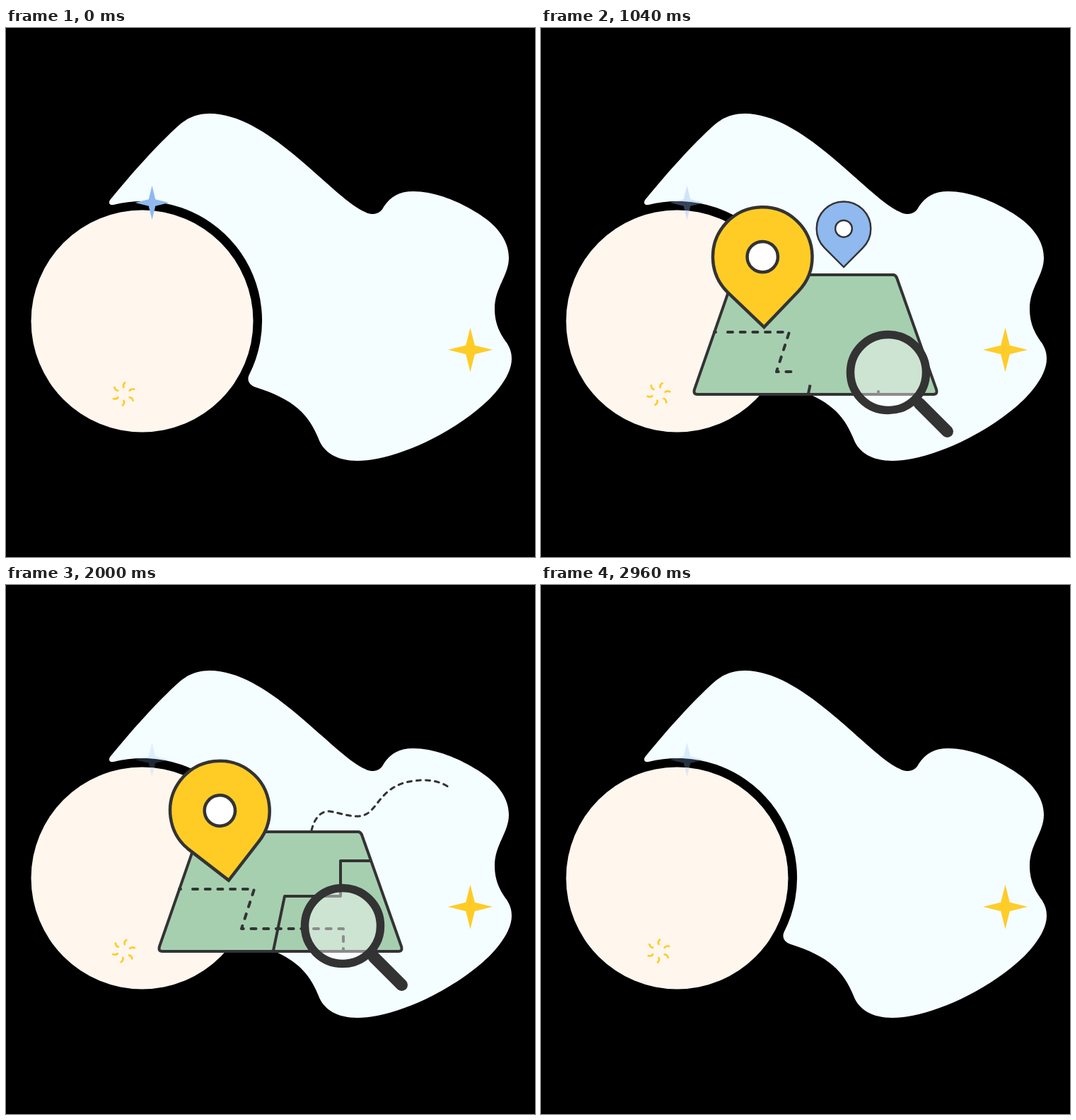
Write an HTML page that moves like this. It is 748x748 px and loops after 3000 ms.

```html
<!DOCTYPE html>
<html lang="en">
<head>
<meta charset="utf-8">
<title>Map search</title>
<style>
html, body { margin: 0; height: 100%; overflow: hidden; background: #000; }
svg { display: block; width: 100%; height: 100%; }
.line { fill: none; stroke: #333; stroke-width: 4; stroke-linecap: round; stroke-linejoin: round; }
</style>
</head>
<body>
<svg viewBox="0 0 748 748">
  <defs>
    <path id="star" d="M0-1L.2-.2 1 0 .2.2 0 1-.2.2-1 0-.2-.2Z"/>
    <g id="pin" stroke="#333" stroke-width="4.5">
      <path d="M0 0L-49.7-49.7A70.3 70.3 0 1 1 49.7-49.7Z"/>
      <circle cy="-99.4" r="21.7" fill="#fff"/>
    </g>
  </defs>

  <path fill="#f4fdff" d="M148 242C180 203 215 164 244 138C257 126 272 121 288 121
    C380 121 478 263 519 263C526 263 531 259 534 253C544 238 556 231 576 231
    C618 231 665 258 685 275C704 292 711 309 711 325C711 350 691 367 691 397
    C691 420 700 434 708 445C713 453 715 459 715 468C715 490 694 518 665 541
    C610 585 540 612 497 612C468 612 449 600 442 581C428 546 407 525 353 508
    C344 505 340 498 344 490A169 169 0 0 0 152 250C146 251 144 247 148 242Z"/>
  <circle cx="192.5" cy="414.5" r="157" fill="#fff6ee"/>
  <use id="blueStar" href="#star" fill="#8fb9ef" transform="translate(206.5 247) scale(24)"/>
  <use id="yellowStar" href="#star" fill="#ffcc26" transform="translate(656.5 455) scale(31.5)"/>
  <g id="burst" fill="none" stroke="#ffcc26" stroke-width="2.7" stroke-linecap="round"></g>

  <g id="map">
    <path id="trail" class="line" style="stroke-width:3" d="M432 347C436 330 445 319 458 320
      C474 323 484 327 497 327C530 327 522 276 592 276C606 276 618 280 626 286"/>
    <path id="trailDot" class="line" style="stroke-width:3" d="M620.5 282.5l1.5.8"/>
    <path class="line" style="fill:#a6cfb0" d="M278 349H498Q501 349 503 353L559 511Q561 518 555 518
      H221Q215 518 217 511L272 353Q274 349 278 349Z"/>
    <path id="route" class="line" d="M245 430h2m17 0H351L333 486H477V516"/>
    <path id="routeDot" class="line" d="M477 514v.4"/>
    <path id="road" class="line" style="stroke-linecap:butt" d="M378 517L394 440H473V390H517"/>
  </g>
  <use id="bluePin" href="#pin" fill="#8fb9ef"/>
  <use id="yellowPin" href="#pin" fill="#ffcc26"/>
  <g id="lens">
    <path class="line" style="stroke-width:17" d="M44 44L83.5 83.5"/>
    <circle r="53.5" fill="#fff" fill-opacity=".43" stroke="#333" stroke-width="11.5"/>
  </g>
</svg>
<script>
const LOOP = 3000, STEP = 40;
const el = Object.fromEntries([...document.querySelectorAll('svg [id]')].map(e => [e.id, e]));
const clamp = v => Math.max(0, Math.min(1, v));
const ramp = (t, from, to) => clamp((t - from) / (to - from));
const fade = (t, a, b, c, d) => Math.min(ramp(t, a, b), 1 - ramp(t, c, d));
const show = (e, opacity) => e.setAttribute('opacity', opacity);
const move = (e, transform) => e.setAttribute('transform', transform);

// Keys are [time, value...]; column i is read, linear or as a smooth spline.
function track(keys, t, i = 1, smooth = false) {
  let k = keys.findIndex(key => key[0] > t);
  if (k < 0) return keys.at(-1)[i];
  if (k === 0) return keys[0][i];
  const a = keys[k - 1], b = keys[k], u = ramp(t, a[0], b[0]);
  if (!smooth) return a[i] + (b[i] - a[i]) * u;
  const p = keys[k - 2] || a, n = keys[k + 1] || b, span = b[0] - a[0];
  const ma = (b[i] - p[i]) / (b[0] - p[0]) * span;
  const mb = (n[i] - a[i]) / (n[0] - a[0]) * span;
  const u2 = u * u, u3 = u2 * u;
  return (2 * u3 - 3 * u2 + 1) * a[i] + (u3 - 2 * u2 + u) * ma
    + (3 * u2 - 2 * u3) * b[i] + (u3 - u2) * mb;
}

// Reveals the first part of a path, optionally dashed.
function reveal(e, length, dash = 1e4, gap = 0) {
  const list = [];
  for (let p = 0; p < length; p += dash + gap) list.push(Math.min(dash, length - p), gap);
  if (list.length) list[list.length - 1] = 2000;
  e.setAttribute('stroke-dasharray', list.join(' '));
  e.setAttribute('visibility', length > 0 ? 'visible' : 'hidden');
}

const lensKeys = [
  [600, 583, 445], [680, 581, 446], [860, 536, 476], [980, 504, 489], [1040, 491, 487],
  [1180, 472, 484], [1360, 488, 468], [1640, 543, 456], [1720, 540, 463],
  [1880, 500, 486], [2000, 476, 482], [2160, 472, 483], [2800, 472, 483]];
const spinKeys = [[0, 0], [680, 47], [1040, 73], [1640, 103], [2000, 128], [2560, 150], [2960, 180]];
const glowKeys = [[0, 1], [560, .3], [1040, .37], [1320, .8], [1640, .43], [2000, .22],
  [2560, .65], [2800, .3], [2960, .27]];

for (let a = 0; a < 360; a += 60)
  el.burst.innerHTML += `<path d="M1.5-16Q-1.7-12.5 0-9.5" transform="rotate(${a})"/>`;
const trailLength = el.trail.getTotalLength();
const roadLength = el.road.getTotalLength();

function draw(t) {
  const wave = (1 + Math.cos(t / 1000 * 2 * Math.PI)) / 2;
  show(el.yellowStar, wave);
  show(el.blueStar, track(glowKeys, t));
  move(el.burst, `translate(166.5 517.5) rotate(${track(spinKeys, t)}) scale(${1 + .35 * (1 - wave)})`);

  show(el.map, fade(t, 40, 320, 2800, 2920));
  const route = ramp(t, 600, 1400), trail = ramp(t, 1200, 2000);
  reveal(el.route, route * 339 - 19 + (route > 0 ? 4 : 0) , 7, 10.7);
  reveal(el.trail, trail * trailLength, 6, 7);
  reveal(el.road, ramp(t, 1000, 1800) * roadLength);
  show(el.routeDot, +(route > 0));
  show(el.trailDot, +(trail > 0 && trail < 1));

  const swing = -7.3 * Math.sin((t - 1020) / 773 * 2 * Math.PI);
  move(el.yellowPin, `rotate(${swing} 265 424) translate(315.3 424)`);
  show(el.yellowPin, fade(t, 160, 440, 2800, 2920));

  const u = 1 - (1 - ramp(t, 1200, 2560)) ** 1.25;
  const x = 428 + 128 * u - 11.5 * u * u, y = 338 - 16 * u - 36.5 * u * u;
  move(el.bluePin, `translate(${x} ${y}) scale(.545)`);
  show(el.bluePin, t < 2000 ? fade(t, 440, 640, 1720, 1880) : fade(t, 2080, 2240, 2520, 2720));

  move(el.lens, `translate(${track(lensKeys, t, 1, true)} ${track(lensKeys, t, 2, true)})`);
  show(el.lens, fade(t, 320, 560, 2640, 2800));
}

const start = performance.now();
function tick() {
  const t = (performance.now() - start) % LOOP;
  draw(Math.floor(t / STEP) * STEP);
  requestAnimationFrame(tick);
}
tick();
</script>
</body>
</html>
```
